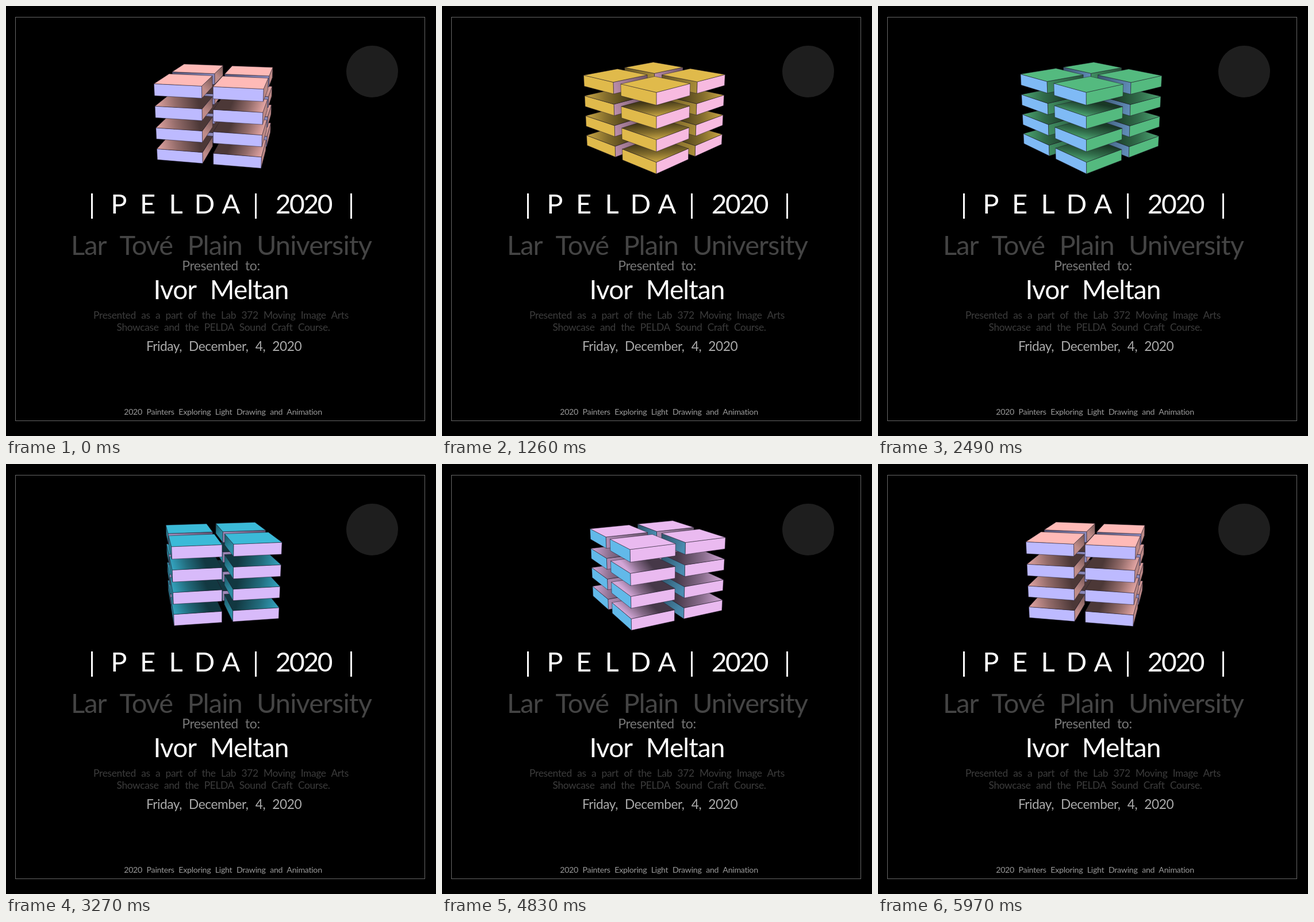
Write an HTML page with a canvas that moves like this. It is 748 px wide and 748 px high and loops after 6 s.

```html
<!DOCTYPE html>
<html lang="en">
<head>
<meta charset="utf-8">
<title>Certificate</title>
<style>
  html, body { margin: 0; width: 100%; height: 100%; overflow: hidden; background: #000; }
  svg, canvas { position: absolute; left: 0; top: 0; width: 748px; height: 748px; }
  canvas { filter: blur(.4px); }
  text {
    font-family: Lato, "Open Sans", sans-serif; text-anchor: middle;
    letter-spacing: -.02em; word-spacing: .3em;
  }
  .year { letter-spacing: -.05em; }
</style>
</head>
<body>
<svg viewBox="0 0 748 748">
  <rect x="16.5" y="19.5" width="712" height="702" fill="none" stroke="#666"/>
  <circle cx="637" cy="114" r="45" fill="#1e1e1e"/>
  <g fill="#fff" font-size="47">
    <path d="M148 326h3v44h-3zM433 326h3v44h-3zM599 326h3v44h-3z"/>
    <text y="361"><tspan x="196">P</tspan><tspan x="246">E</tspan><tspan x="295">L</tspan><tspan x="345">D</tspan><tspan x="391">A</tspan></text>
    <text class="year" x="517.5" y="361" font-size="46">2020</text>
  </g>
  <text x="374.5" y="433" font-size="47" fill="#444">Lar Tové Plain University</text>
  <text x="374" y="460" font-size="23" fill="#777">Presented to:</text>
  <text x="374" y="510" font-size="46" fill="#fff">Ivor Meltan</text>
  <g font-size="17.4" fill="#3c3c3c">
    <text x="374" y="544">Presented as a part of the Lab 372 Moving Image Arts</text>
    <text x="378" y="565">Showcase and the PELDA Sound Craft Course.</text>
  </g>
  <text x="379" y="600" font-size="22.7" fill="#aaa">Friday, December, 4, 2020</text>
  <text x="377.5" y="711" font-size="14.2" fill="#999">2020 Painters Exploring Light Drawing and Animation</text>
</svg>
<canvas id="stage" width="748" height="748"></canvas>
<script>
const ctx = document.getElementById('stage').getContext('2d');
const { sin, cos, PI, min } = Math;
const RAD = PI / 180;

// Camera and stack dimensions, in pixels at the centre of the stack
const CX = 369.8, CY = 182.2, DIST = 740, PITCH = 16.8 * RAD;
const SLAB = 76, OFFSET = 46.8, THICK = 19, LAYER = 36, HEIGHT = 127;
const CORNERS = [[-1, -1], [1, -1], [1, 1], [-1, 1]];
const NORMALS = [[0, -1], [1, 0], [0, 1], [-1, 0]];

let yaw = 0;

function turn([x, z]) {
  return [x * cos(yaw) - z * sin(yaw), z * cos(yaw) + x * sin(yaw)];
}

function project(x, y, z) {
  const [tx, tz] = turn([x, z]);
  const depth = y * sin(PITCH) + tz * cos(PITCH);
  const s = DIST / (DIST - depth);
  return [CX + s * tx, CY - s * (y * cos(PITCH) - tz * sin(PITCH)), depth];
}

// Colour from a surface normal, held in linear light
function normalColor(nx, nz) {
  return [nx, 0, nz].map(n => 255 * (0.5 + 0.5 * n) ** (1 / 2.2));
}

const shade = (color, k) => `rgb(${color.map(c => Math.round(c * k)).join()})`;

function fade(from, to, color, stops) {
  const g = ctx.createLinearGradient(from[0], from[1], to[0], to[1]);
  for (const [at, k] of stops) g.addColorStop(at, shade(color, k));
  return g;
}

function face(points, fill) {
  ctx.beginPath();
  for (const [x, y] of points) ctx.lineTo(x, y);
  ctx.closePath();
  ctx.fillStyle = fill;
  ctx.fill();
  ctx.stroke();
}

function slab(column, layer, colors) {
  const yTop = HEIGHT / 2 - layer * LAYER;
  const center = column.map(c => c * OFFSET);
  const ring = y => CORNERS.map(([x, z]) =>
    project(center[0] + x * SLAB / 2, y, center[1] + z * SLAB / 2));
  const top = ring(yTop), bottom = ring(yTop - THICK);

  NORMALS.forEach((n, i) => {
    const j = (i + 1) % 4, a = top[i], b = top[j], c = bottom[j];
    if ((b[0] - a[0]) * (c[1] - b[1]) - (b[1] - a[1]) * (c[0] - b[0]) >= 0) return;
    const color = n[0] ? colors.main : n[1] > 0 ? colors.front : colors.back;
    const inner = n[0] * column[0] + n[1] * column[1] < 0;
    const [near, far] = a[2] > b[2] ? [a, b] : [b, a];
    face([a, b, c, bottom[i]], inner
      ? fade(near, far, color, [[0, 0.75], [1, 0.45]])
      : shade(color, min(1, 0.55 + 0.95 * turn(n)[1])));
  });

  // Lower tops darken away from the outer corner, under the slab above
  const outer = CORNERS.findIndex(([x, z]) => x === column[0] && z === column[1]);
  face(top, layer
    ? fade(top[outer], top[(outer + 2) % 4], colors.main, [[0, 0.9], [0.35, 0.58], [0.75, 0.3], [1, 0.3]])
    : shade(colors.main, 1));
}

function draw(time) {
  const u = Math.floor(time % 6000 / 30) / 199;
  // One full turn, slower at both ends
  const spin = (360 * u - 17.6 * sin(2 * PI * u) - 2.5 * sin(4 * PI * u)) * RAD;
  yaw = 11.5 * RAD - spin;
  const hue = spin + 2 * RAD, s = sin(hue), c = cos(hue);
  const colors = { main: normalColor(c, -s), front: normalColor(s, c), back: normalColor(-s, -c) };

  ctx.clearRect(0, 0, 748, 748);
  ctx.lineJoin = 'round';
  ctx.strokeStyle = 'rgba(30,25,40,.5)';
  const columns = [...CORNERS].sort((p, q) => turn(p)[1] - turn(q)[1]);
  for (let layer = 3; layer >= 0; layer--)
    for (const column of columns) slab(column, layer, colors);
}

const start = performance.now();
function loop() {
  draw(performance.now() - start);
  requestAnimationFrame(loop);
}
loop();
</script>
</body>
</html>
```
